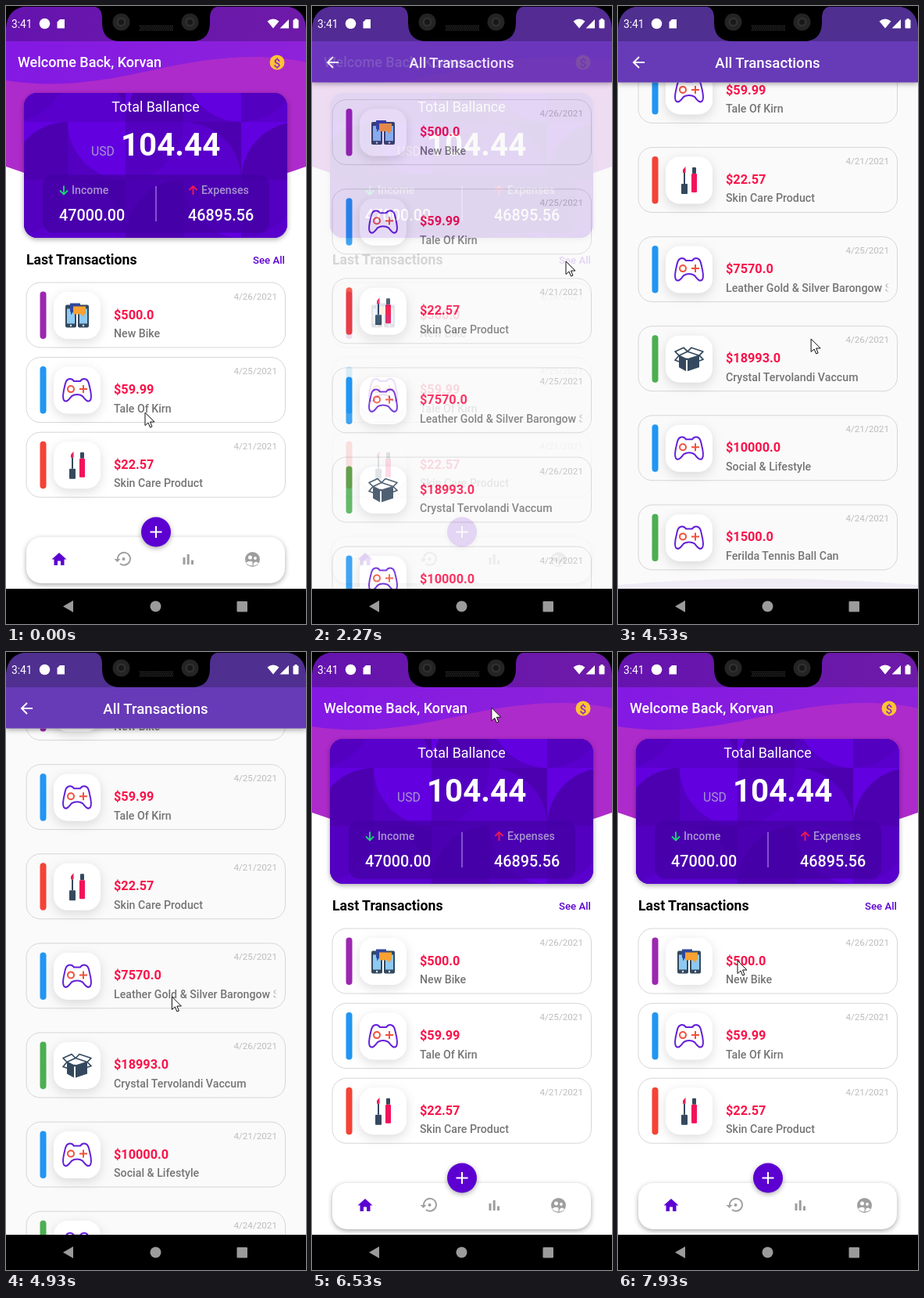
An HTML page for the animation above (8000 ms loop, 384x789 px).

```html
<!DOCTYPE html>
<html lang="en">
<head>
<meta charset="utf-8">
<title>Expense tracker</title>
<style>
html, body { margin: 0; width: 100%; height: 100%; overflow: hidden; background: #000; }
svg { display: block; width: 100vw; height: 100vh; }
text { font-family: Roboto, sans-serif; white-space: pre; }
.m { font-weight: 500; }
.b { font-weight: 700; }
.soft { filter: drop-shadow(0 4px 7px #0002); }
.lift { filter: drop-shadow(0 2px 3px #0005); }
</style>
</head>
<body>
<svg id="stage" viewBox="0 0 384 789" preserveAspectRatio="none"></svg>
<script>
const PURPLE = '#5c00d2', GREY = '#757575', VIOLET = '#a700f5', SLATE = '#34495e', IDLE = '#9e9e9e';

const text = (x, y, size, fill, str, cls = '', anchor = 'start') =>
  `<text x="${x}" y="${y}" font-size="${size}" fill="${fill}" class="${cls}" text-anchor="${anchor}">${str}</text>`;
const rect = (x, y, w, h, r, fill, more = '') =>
  `<rect x="${x}" y="${y}" width="${w}" height="${h}" rx="${r}" fill="${fill}" ${more}/>`;
const circle = (x, y, r, fill, more = '') =>
  `<circle cx="${x}" cy="${y}" r="${r}" fill="${fill}" ${more}/>`;
const path = (d, fill, more = '') => `<path d="${d}" fill="${fill}" ${more}/>`;
const line = (d, stroke, width, more = '') =>
  path(d, 'none', `stroke="${stroke}" stroke-width="${width}" ${more}`);
const at = (x, y, body, more = '') => `<g transform="translate(${x} ${y}) ${more}">${body}</g>`;
const mirrored = body => body + at(0, 0, body, 'scale(-1 1)');
const repeat = (n, draw) => Array.from({ length: n }, (_, i) => draw(i)).join('');

// Item icons are drawn around their centre
const phone = x => rect(x, -13, 14, 29, 2, SLATE) + rect(x + 2, -8, 10, 19, 0, '#8ec9f2') +
  circle(x + 7, 13.5, 1.2, '#dfe8ee');
const icons = {
  phones: phone(-15) + phone(1) +
    path('M-9-15H4V-4H-5l-3 4v-4h-1z', '#2f479c') + path('M-5-11H11V-1H9v4l-4-4H-5z', '#f9a132'),
  pad: mirrored(line('M0-11H4Q6-14 9-14C14-14 15-9 16-4C18 4 19 10 17 13C14 17 10 12 7 8Q4 6 0 6', '#6420d8', 2)) +
    circle(-8, -1, 4, 'none', 'stroke="#f0503c" stroke-width="2"') + line('M3-1h10M8-6V4', '#f0503c', 2),
  lipstick: rect(-10, 5, 8, 13, 1, SLATE) + rect(-7, -9, 2, 14, 0, SLATE) +
    path('M-8-9v-4l3.500-4v8z', '#e91e55') +
    rect(4, -16, 5, 8, 1, SLATE) + rect(3, -8, 7, 24, 1, '#f3125a'),
  box: path('M-13-4L-4 0V16L-13 11zM-2 1L13-4V11L-2 16z', SLATE) +
    line('M-13-4L-18 2L-9 5L-3 0L4 6L18 1L13-4L-2-9zL-18-9L-7-14L-2-9L3-14L18-9L13-4L-3 1z',
      SLATE, 1.7, 'stroke-linejoin="round"')
};

const card = (y, [amount, name, date, bar, icon]) => at(0, y,
  rect(26, 0, 331.5, 83, 18, 'none', 'stroke="#d6d6d6"') +
  rect(43.5, 11.5, 8, 60.5, 4, bar) +
  rect(61, 12, 60, 60, 18, '#fff', 'class="soft"') + at(91, 41.5, icons[icon]) +
  text(347, 21.5, 11.7, '#bdbdbd', date, '', 'end') +
  text(138, 46.5, 16.3, '#fa1248', amount, 'b') +
  text(138, 70, 14.2, 'url(#fadeName)', name, 'm'));

const violet = '#9c27b0', blue = '#2196f3', red = '#f44336', green = '#4caf50';
const items = [
  ['$500.0', 'New Bike', '4/26/2021', violet, 'phones'],
  ['$59.99', 'Tale Of Kirn', '4/25/2021', blue, 'pad'],
  ['$22.57', 'Skin Care Product', '4/21/2021', red, 'lipstick'],
  ['$7570.0', 'Leather Gold &amp; Silver Barongow Set', '4/25/2021', blue, 'pad'],
  ['$18993.0', 'Crystal Tervolandi Vaccum', '4/26/2021', green, 'box'],
  ['$10000.0', 'Social &amp; Lifestyle', '4/21/2021', blue, 'pad'],
  ['$1500.0', 'Ferilda Tennis Ball Can', '4/24/2021', green, 'pad'],
  ['$8250.0', '', '4/22/2021', green, 'pad']
];
const cards = (count, top, pitch) => repeat(count, i => card(top + pitch * i, items[i]));

const defs = `<defs>
  <linearGradient id="fadeName" gradientUnits="userSpaceOnUse" x1="339" x2="347" y1="0" y2="0">
    <stop stop-color="${GREY}"/><stop offset="1" stop-color="${GREY}" stop-opacity="0"/></linearGradient>
  <linearGradient id="top"><stop stop-color="#8319e3"/><stop offset="1" stop-color="#8e22da"/></linearGradient>
  <clipPath id="screen">${rect(0, 0, 384, 744, 0, '#000')}</clipPath>
  <clipPath id="body">${rect(0, 97.5, 384, 646.5, 0, '#000')}</clipPath>
  <clipPath id="balance">${rect(23, 111, 337, 185, 17, '#000')}</clipPath>
</defs>`;

// Quarter discs turned a different way in each square tile
const shades = ['#4d00b0', '#5900cc', '#5300c0', '#6200e0'];
const tile = i => {
  const col = i % 5, row = Math.floor(i / 5), k = col * 3 + row * 2;
  const disc = path('M-37-37H37A74 74 0 0 1-37 37z', shades[(k + 2) % 4]);
  return at(42 + 74 * col, 111 + 74 * row,
    rect(-37, -37, 74.5, 74.5, 0, shades[(k + 1) % 4]) + at(0, 0, disc, `rotate(${90 * (k % 4)})`));
};
const pattern = `<g clip-path="url(#balance)">${repeat(15, tile)}</g>`;

const people = circle(-3, -2.5, 2.5, '#fff') + circle(3.5, -1.5, 1.9, '#fff') +
  path('M-8 4Q-4 1 0 3V8Q-6 8-8 4zM1 8Q1 3 5 3L8 5Q5 8 1 8z', '#fff');
const tray = path('M68 698l9.500 8.500h-3v7.500h-4.500v-5.500h-4v5.500h-4.500v-7.500h-3z', PURPLE) +
  line('M143 706a8 8 0 1 1 3 6', IDLE, 1.9) + path('M138.500 706h8l-4 4z', IDLE) + circle(150.5, 706, 2, IDLE) +
  rect(226.5, 704, 3, 9, 0, IDLE) + rect(231.7, 700, 3, 13, 0, IDLE) + rect(237, 707.5, 3, 5.5, 0, IDLE) +
  circle(315.5, 706.5, 9.5, IDLE) + at(315.5, 706.5, people);

const home = rect(0, 0, 384, 744, 0, '#fff') +
  path('M0 0H384V205Q192 275 0 205z', '#ad2bca') +
  path('M0 0H384V72C330 59 265 66 215 76S85 109 0 95z', 'url(#top)') +
  rect(0, 0, 384, 45, 0, '#000', 'opacity=".23"') +
  text(15, 78, 18, '#fff', 'Welcome Back, Korvan', 'm') +
  circle(347, 72, 9.5, '#fdc435') + text(347, 77.5, 15.5, '#8d27c8', '$', 'm', 'middle') +
  rect(23, 111, 337, 185, 17, '#5900cc', 'class="lift"') + pattern +
  text(191.5, 135, 17.9, '#fff', 'Total Ballance', '', 'middle') +
  text(109, 191, 15.8, '#a994d0', 'USD') + text(147, 191, 40.3, '#fff', '104.44', 'b') +
  rect(47, 215.5, 290, 74, 14, '#4500a6', 'opacity=".8"') +
  line('M192 230V275', '#8250d2', 2) +
  line('M74 229.500v11m-5-5l5 5l5-5', '#19d873', 1.8) +
  line('M239.500 241v-11m-5 5l5-5l5 5', '#f5174f', 1.8) +
  text(84, 240, 14.2, '#a893d0', 'Income', 'm') + text(250, 240, 14.2, '#a893d0', 'Expenses', 'm') +
  text(68, 274, 19.8, '#fff', '47000.00', 'm') + text(233, 274, 19.8, '#fff', '46895.56', 'm') +
  text(26, 330, 17.7, '#000', 'Last Transactions', 'b') +
  text(357, 329, 13.2, PURPLE, 'See All', 'm', 'end') +
  cards(3, 353, 95.6) +
  rect(26, 678, 331, 59, 19, '#fff', 'class="lift"') + tray +
  circle(192, 671.5, 19, PURPLE, 'class="lift"') + line('M184.500 671.500h15M192 664v15', '#fff', 2);

const list = rect(0, 0, 384, 744, 0, '#fafafa') +
  `<g clip-path="url(#body)"><g id="scroll">${cards(8, 119.6, 114.1)}</g>` +
  at(0, 744, path('M0 0V-9Q192-39 384-9V0z', '#673ab7', 'id="glow" opacity=".07"')) + '</g>' +
  rect(0, 0, 384, 97.5, 0, '#673ab7', 'class="lift"') + rect(0, 0, 384, 45, 0, '#4f2f90') +
  line('M34 72H20m7-7l-7 7l7 7', '#fff', 2) +
  text(191.5, 78.5, 18.6, '#fff', 'All Transactions', 'm', 'middle');

const span = (fill, cls, str) => `<tspan fill="${fill}" class="${cls}">${str}</tspan>`;
const sheet = rect(0, 499.5, 384, 245, 0, '#fbfbfb') +
  text(18, 530.5, 13.07, '#000', span('#000', 'b', 'Add income : ') + span(GREY, 'm', '( Your Total Income: ') +
    span(VIOLET, 'b', '$47000.00') + span(GREY, 'm', ' )')) +
  rect(18.5, 557, 346.5, 53, 19, '#f2f2f2', 'stroke="#ccc"') + text(46, 588.5, 16, GREY, '$50') +
  text(18, 647, 13.07, '#000', span('#000', 'b', 'Date : ') + span(GREY, 'm', '4/27/2021')) +
  text(350, 647, 13.07, VIOLET, 'Change Date', 'm', 'end') +
  rect(18.5, 679, 346.5, 46, 23, PURPLE, 'class="lift"') + text(191.5, 708, 17, '#fff', 'Save', 'm', 'middle');

const lens = x => circle(x, 20.5, 11, '#242424') + circle(x, 20.5, 6, '#303030') + circle(x, 20.5, 3.5, '#181818');
const system = rect(0, 0, 384, 1, 0, '#000') +
  at(192, 0, mirrored(path('M-192 0H-164Q-190 2-192 28zM0 0H-84Q-69 0-69 15V21Q-69 45-45 45H0z', '#000'))) +
  lens(147.5) + lens(235.5) +
  line('M171 25.500h43M172 28h42M171 30.500h43', '#3a3a3a', 1.3, 'stroke-dasharray="1.3 1"') +
  text(7, 28, 13.8, '#fff', '3:41') + circle(49.5, 22.5, 6.8, '#fff') +
  path('M69 17h6v11.500h-9.500v-8z', '#fff') +
  path('M334.500 19.500Q342 13.500 349.500 19.500L342 28.500zM362 17v11.500h-11.500z', '#fff') +
  rect(367.5, 17.5, 7, 11, 1, '#fff') + rect(369.5, 16, 3, 2, 0, '#fff') +
  rect(0, 744, 384, 45, 0, '#000') +
  path('M86 759v15l-13-7.500z', '#9b9b9b') + circle(191.5, 766.5, 7, '#9b9b9b') + rect(295.5, 760, 13.5, 13.5, 1, '#9b9b9b');

document.getElementById('stage').innerHTML = defs +
  `<g clip-path="url(#screen)">${home}<g id="page">${list}</g>` +
  rect(0, 0, 384, 744, 0, '#000', 'id="scrim"') + `<g id="sheet">${sheet}</g></g>` + system +
  path('M0 0V16.500L4 13L6.500 19L9 18L6.500 12H12z', '#fff', 'id="cursor" stroke="#111"');

const LOOP = 8000, TICK = LOOP / 120;
const ramp = (t, from, to) => Math.min(1, Math.max(0, (t - from) / (to - from)));
const easeOut = p => 1 - (1 - p) ** 2;

// Pointer moves: start and end time, then where it arrives
const start = [178, 519];
const moves = [
  [270, 600, 135, 410], [600, 1130, 307, 358], [1130, 1470, 325, 326],
  [2470, 3130, 284, 206], [3130, 3700, 262, 490], [3700, 4200, 256, 335],
  [4200, 4800, 240, 497], [4800, 5800, 33, 70], [6200, 6730, 346, 72],
  [7070, 7330, 175, 253], [7400, 7530, 104, 295], [7730, 7930, 153, 394]
];
const pointer = t => moves.reduce(([x, y], [from, to, nx, ny]) => {
  const p = ramp(t, from, to);
  return [x + (nx - x) * p, y + (ny - y) * p];
}, start);

const set = (id, name, value) => document.getElementById(id).setAttribute(name, value);
function draw(t) {
  const page = ramp(t, 2070, 2300) - ramp(t, 5940, 6200);
  const scroll = 234 * easeOut(ramp(t, 2670, 3130)) - 212 * easeOut(ramp(t, 4270, 5800));
  const glow = ramp(t, 3500, 3800) - ramp(t, 4200, 4920);
  const open = easeOut(ramp(t, 6800, 7070)) - ramp(t, 7670, 7900);
  set('page', 'opacity', page);
  set('scroll', 'transform', `translate(0 ${-scroll})`);
  set('glow', 'transform', `scale(1 ${glow})`);
  set('scrim', 'opacity', .54 * open);
  set('sheet', 'transform', `translate(0 ${246 * (1 - open)})`);
  set('cursor', 'transform', `translate(${pointer(t)})`);
}

// The screen refreshes 15 times a second; the half-tick margin absorbs rounding
function frame(now) {
  const t = (now + TICK / 8) % LOOP;
  draw(Math.floor(t / TICK) * TICK);
  requestAnimationFrame(frame);
}
requestAnimationFrame(() => frame(performance.now()));
</script>
</body>
</html>
```
